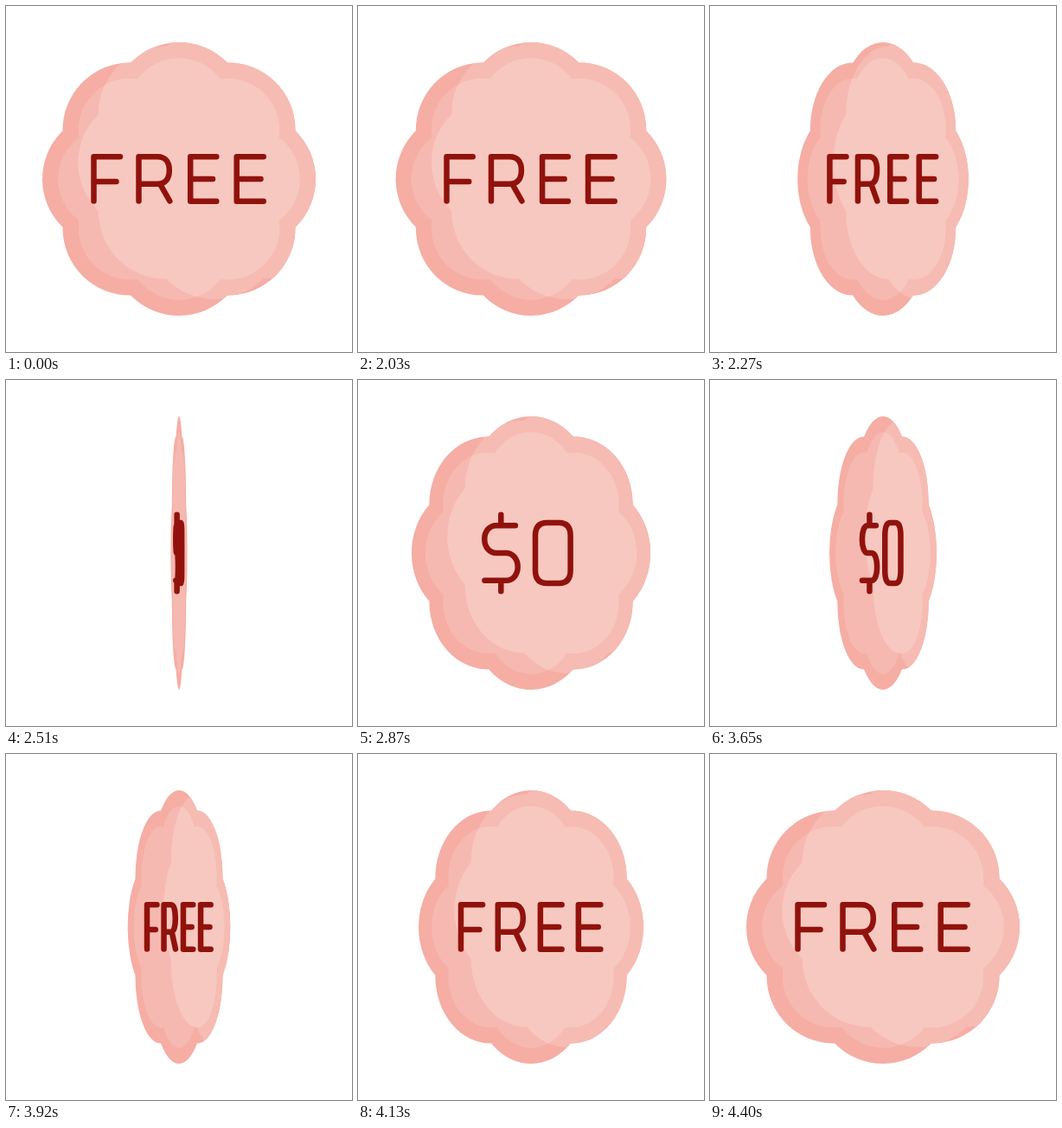
An HTML page with a canvas that plays this animation: 400 by 400 pixels, repeating every 4.43 s.

```html
<!DOCTYPE html>
<html lang="en">
<head>
<meta charset="utf-8">
<title>Free badge</title>
<style>
html, body { margin: 0; width: 100%; height: 100%; overflow: hidden; background: #fff; }
canvas { display: block; width: 400px; height: 400px; }
</style>
</head>
<body>
<canvas id="stage" width="400" height="400" role="img" aria-label="FREE, $0"></canvas>
<script>
const ctx = document.getElementById('stage').getContext('2d');
const LOOP = 4430, HOLD = 2015, END = 4395;

// Turn of the badge: [ms, degrees]
const turn = [
  [1985, 0], [2030, 8], [2510, 93.3], [2870, 150.8], [3080, 170.8], [3240, 180],
  [3350, 195.2], [3785, 270], [3920, 291.9], [4160, 329.4], [4400, 357]
];

// Eight-lobed outline around the origin
function scallop(dist, r) {
  const path = new Path2D(), step = Math.PI / 4, half = step / 2;
  const notch = dist * Math.cos(half) + Math.sqrt(r * r - (dist * Math.sin(half)) ** 2);
  const sweep = Math.atan2(notch * Math.sin(half), notch * Math.cos(half) - dist);
  for (let i = 0; i < 8; i++) {
    const a = i * step;
    path.arc(dist * Math.cos(a), dist * Math.sin(a), r, a - sweep, a + sweep);
  }
  path.closePath();
  return path;
}

const rim = scallop(80.2, 77.8);
const face = scallop(80.2, 59.6);

const free = new Path2D(
  'M-98.5 25.5V-25.7H-68M-98.5 3H-72.5' +
  'M-46.5 25.5V-25.7H-25C-15-25.7-11.2-19-11.2-10C-11.2-1-15 5.7-25 5.7H-46.5M-22 5.7L-10.7 25.5' +
  'M43.3-25.7H13.2V25.7H43.3M13.2 0H39' +
  'M97.7-25.7H66.7V25.7H97.7M66.7 0H94.5');

const zero = new Path2D(
  'M-39.7-44.2V-32M-39.7 32V44.2' +
  'M-20.7-31.8H-46C-55-31.8-61.5-25-61.5-16C-61.5-7-55 0-46 0H-33C-24 0-17.5 7-17.5 16C-17.5 25-24 31.8-33 31.8H-61.3' +
  'M21-35H37Q52.2-35 52.2-20V20Q52.2 35 37 35H21Q5.7 35 5.7 20V-20Q5.7-35 21-35Z');

const squeeze = (path, sx) => {
  const out = new Path2D();
  out.addPath(path, new DOMMatrix([sx, 0, 0, 1, 0, 0]));
  return out;
};

const slope = (a, b) => (b[1] - a[1]) / (b[0] - a[0]);

// Smooth curve through the turn keys
function angleAt(t) {
  if (t < HOLD || t >= END) return 0;
  const i = turn.findIndex((k, n) => n && t <= k[0]) - 1;
  const a = turn[i], b = turn[i + 1];
  const va = slope(turn[Math.max(i - 1, 0)], b);
  const vb = slope(a, turn[Math.min(i + 2, turn.length - 1)]);
  const d = b[0] - a[0], u = (t - a[0]) / d, w = 1 - u;
  return w * w * ((1 + 2 * u) * a[1] + u * d * va) + u * u * ((3 - 2 * u) * b[1] - w * d * vb);
}

function fill(path, color) {
  ctx.fillStyle = color;
  ctx.fill(path);
}

function draw(t) {
  const c = Math.cos(angleAt(t) * Math.PI / 180);
  const sx = Math.max(Math.abs(c), 0.004);
  const outer = squeeze(rim, sx), inner = squeeze(face, sx);

  ctx.setTransform(1, 0, 0, 1, 0, 0);
  ctx.fillStyle = '#fff';
  ctx.fillRect(0, 0, 400, 400);
  ctx.translate(200, 200);
  fill(outer, '#f5ada4');
  fill(inner, '#f6b9b1');

  // The light keeps a fixed offset while the badge turns
  ctx.save();
  ctx.translate(41.4, -19);
  ctx.clip(outer);
  ctx.translate(-41.4, 19);
  fill(outer, '#f6bbb2');
  fill(inner, '#f7c8c0');
  ctx.restore();

  ctx.strokeStyle = '#91120c';
  ctx.lineWidth = 6.5;
  ctx.lineCap = ctx.lineJoin = 'round';
  ctx.stroke(squeeze(c < 0 ? zero : free, sx));
}

const start = performance.now();
function tick() {
  draw((performance.now() - start) % LOOP);
  requestAnimationFrame(tick);
}
tick();
</script>
</body>
</html>
```
